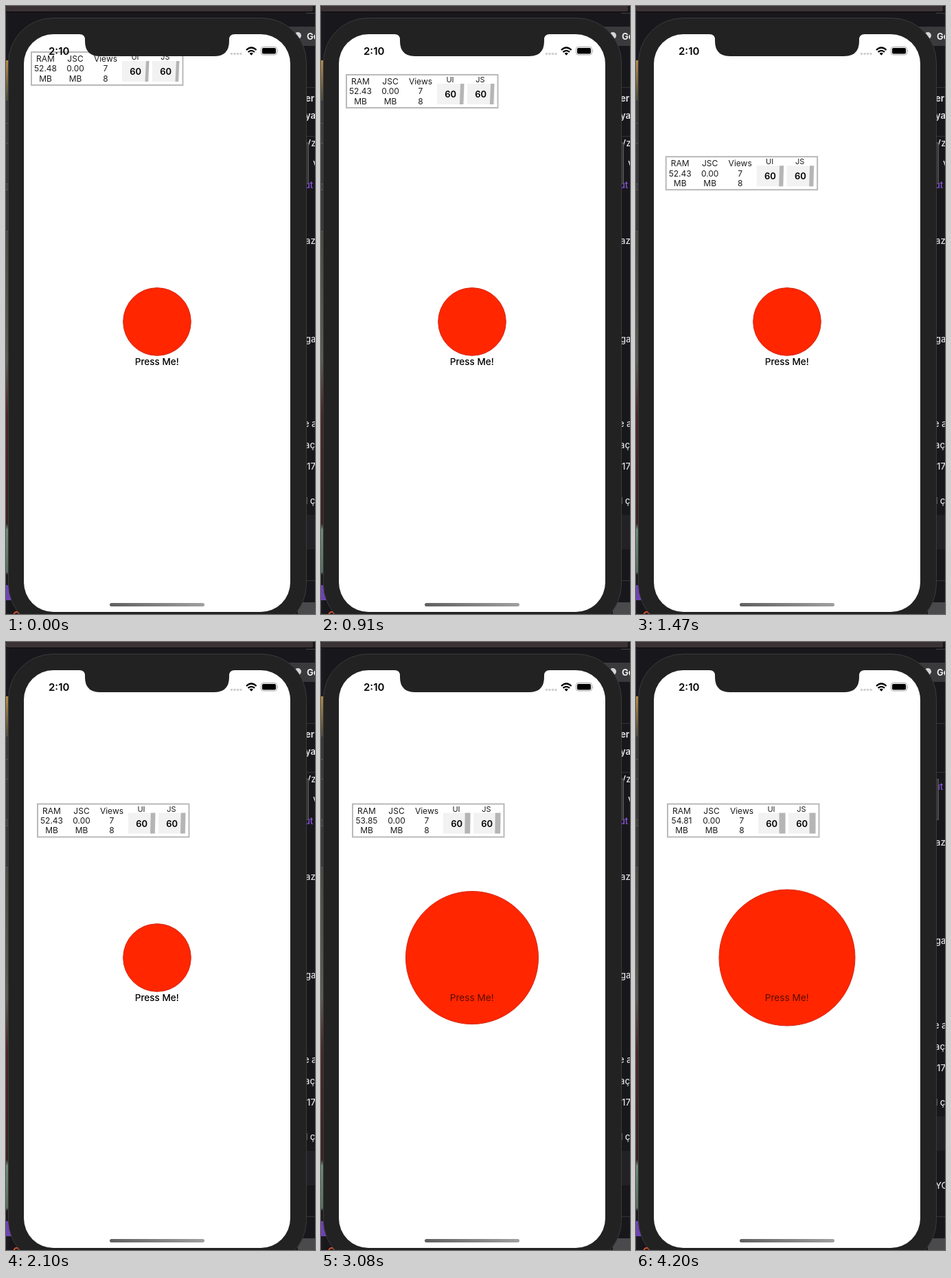
An HTML page that plays this animation: 450x884 px, repeating every 4.27 s.

```html
<!DOCTYPE html>
<html lang="en">
<head>
<meta charset="utf-8">
<style>
html, body { margin: 0; width: 100%; height: 100%; overflow: hidden; background: #18171b; }
svg { display: block; width: 100%; height: 100%; font-family: Inter, Roboto, sans-serif; }
.mid { text-anchor: middle; }
</style>
</head>
<body>
<svg viewBox="0 0 450 884">
  <defs>
    <linearGradient id="strip" x2="0" y2="1">
      <stop offset="0" stop-color="#1c1a1f"/>
      <stop offset=".08" stop-color="#1c1a1f"/>
      <stop offset=".08" stop-color="#b58a42"/>
      <stop offset=".14" stop-color="#55503f"/>
      <stop offset=".16" stop-color="#38383a"/>
      <stop offset=".38" stop-color="#4b4a45"/>
      <stop offset=".58" stop-color="#5b5a54"/>
      <stop offset=".67" stop-color="#4a2426"/>
      <stop offset=".85" stop-color="#3b2022"/>
      <stop offset=".86" stop-color="#6c8a78"/>
      <stop offset=".93" stop-color="#567060"/>
      <stop offset=".935" stop-color="#1c1a1f"/>
    </linearGradient>
    <linearGradient id="bar"><stop stop-color="#606060"/><stop offset="1" stop-color="#a0a0a0"/></linearGradient>
    <clipPath id="chatArea"><rect id="chatClip" x="410" width="40"/></clipPath>
    <clipPath id="screen"><rect x="26" y="41" width="388" height="840" rx="43"/></clipPath>
  </defs>

  <!-- desktop behind the phone -->
  <rect width="450" height="884" fill="#18171b"/>
  <rect width="447" height="8" rx="2" fill="#3a3234"/>
  <path d="M0 8.5H450" stroke="#0b0a0c"/>
  <path d="M437 10.500H450" stroke="#454047"/>
  <rect y="9" width="4" height="875" fill="url(#strip)"/>
  <rect y="842" width="12" height="22" fill="#6f42b4"/>
  <circle cx="15.500" cy="885" r="4" fill="none" stroke="#d9532f" stroke-width="2"/>
  <rect x="405" y="30" width="45" height="28" fill="#3a393c"/>
  <circle cx="425" cy="43" r="5" fill="#d5d5d7"/>
  <text x="438" y="49" font-size="13" font-weight="700" fill="#eee">Ge</text>
  <path d="M430 118.500H450M430 189.500H450M430 835.500H450" stroke="#343338"/>
  <rect x="425" y="867" width="25" height="17" fill="#4a494b"/>
  <g clip-path="url(#chatArea)"><g id="chat" font-size="13" fill="#dedee3">
    <rect x="430" y="740" width="20" height="50" fill="#222126"/>
  </g></g>

  <!-- phone body -->
  <g fill="#39383a" stroke="#59585b">
    <rect x="-6" y="136.500" width="10" height="34"/>
    <rect x="-6" y="199.500" width="10" height="59"/>
    <rect x="-6" y="267.500" width="10" height="60"/>
    <rect x="430" y="199.500" width="10.500" height="59"/>
  </g>
  <rect x="3.500" y="17.500" width="434" height="888" rx="65" fill="#222" stroke="#3b3a3b"/>

  <g clip-path="url(#screen)">
    <rect x="26" y="41" width="388" height="840" fill="#fff"/>
    <text class="mid" x="219.700" y="522" font-size="13.600">Press Me!</text>
    <circle id="ball" cx="220" cy="459" fill="#ff2600" stroke="#d42a12"/>
    <text class="mid" x="219.700" y="522" font-size="13.600" opacity=".65">Press Me!</text>
    <g id="panel" font-size="12" fill="#1c1c1c">
      <rect x="37" y="67" width="220.500" height="48" fill="#fff" stroke="#b9b9b9" stroke-width="2"/>
    </g>
    <rect x="151" y="868" width="138" height="5" rx="2.500" fill="url(#bar)"/>
  </g>
  <path d="M107 40H333V41Q325 41 325 49V51Q325 73 303 73H137Q115 73 115 51V49Q115 41 107 41Z" fill="#222"/>

  <!-- status bar -->
  <text x="62" y="71" font-size="15" font-weight="600">2:10</text>
  <g fill="#d0d0d0">
    <circle cx="328.500" cy="69.500" r="1.800"/><circle cx="333" cy="69.500" r="1.800"/>
    <circle cx="337.500" cy="69.500" r="1.800"/><circle cx="342" cy="69.500" r="1.800"/>
  </g>
  <path d="M350 64Q357.300 57 364.600 64M352.600 67Q357.300 62.600 362 67" fill="none" stroke="#000" stroke-width="2.200"/>
  <path d="M354.700 69Q357.300 66.600 359.900 69L357.300 71.800Z"/>
  <rect x="371.500" y="59.500" width="23" height="11.500" rx="3" fill="none" stroke="#a5a5a5"/>
  <rect x="373" y="61" width="20" height="8.500" rx="1.800"/>
  <path d="M395.600 63.500Q397.200 65.200 395.600 67Z" fill="#a5a5a5"/>
</svg>
<script>
const LOOP = 4270, STEP = 70;
const $ = id => document.getElementById(id);

function add(parent, tag, attrs, text = '') {
  const el = document.createElementNS('http://www.w3.org/2000/svg', tag);
  for (const k in attrs) el.setAttribute(k, attrs[k]);
  el.textContent = text;
  return parent.appendChild(el);
}

// chat fragments peeking out beside the phone
[[436, 139, 'er', 700], [436, 164, 'yal', 600], [435, 204, 'Vzz'], [447, 235, 'V'],
 [435, 265, 'ut', 500, '#8d58e8'], [436, 346, 'azi'], [436, 489, 'ga'], [434, 612, 'e a'],
 [435, 643, 'açs'], [438, 674, '17'], [436, 724, 'l ç'], [436, 845, 'YC']]
  .forEach(([x, y, text, weight = 500, fill = '#dedee3']) =>
    add($('chat'), 'text', { x, y, fill, 'font-weight': weight }, text));

// performance panel
const label = (x, y, text, more) => add($('panel'), 'text', { class: 'mid', x, y, ...more }, text);
const columns = [[57.5, 'RAM', '', 'MB'], [101, 'JSC', '0.00', 'MB'], [145, 'Views', '7', '8']]
  .map(([x, ...rows]) => rows.map((s, i) => label(x, 81.3 + i * 14.1, s)));
const ram = columns[0][1];
const bars = [['UI', 169], ['JS', 213]].map(([name, x]) => {
  label(x + 19, 78, name, { 'font-size': 11 });
  add($('panel'), 'rect', { x, y: 80, width: 39.5, height: 30, fill: '#f2f2f2' });
  label(x + 19.7, 100, '60', { 'font-size': 13, 'font-weight': 600, fill: '#000' });
  return [add($('panel'), 'path', { fill: '#b5b5b5' }), x];
});

const clamp = u => Math.min(1, Math.max(0, u));
const easeInOut = u => u < .5 ? 2 * u * u : 1 - 2 * (1 - u) ** 2;
const ease = (t, from, to) => easeInOut(clamp((t - from) / (to - from)));

// linear track through [time, value] points
const track = (t, points) => points.reduce((v, [time, value], i) => {
  if (!i) return value;
  const [t0, v0] = points[i - 1];
  return t <= t0 ? v : v0 + (value - v0) * clamp((t - t0) / (time - t0));
}, 0);

function draw(t) {
  const dx = track(t, [[910, 0], [1190, 2], [1610, 9]]);
  const dy = track(t, [[560, 0], [770, 11], [910, 33], [1190, 97.5], [1400, 144], [1610, 168.5]]);
  $('panel').setAttribute('transform', `translate(${dx} ${dy})`);
  ram.textContent = t < 630 ? '52.48' : t < 2590 ? '52.43' : t < 3570 ? '53.85' : '54.81';

  const wide = 4.5 + 4.5 * t / LOOP, slant = 1.5 * (1 - t / LOOP);
  for (const [bar, x] of bars)
    bar.setAttribute('d', `M${x + 39.5 - wide} 80H${x + 39.5}L${x + 39.5 - slant} 110H${x + 39.5 - wide - slant}Z`);

  $('ball').setAttribute('r', 49.3 + 49.7 * ease(t, 2490, 3190));

  const scroll = ease(t, 3710, 4130), top = 119 + 71 * scroll;
  $('chat').setAttribute('transform', `translate(0 ${-50.5 * scroll})`);
  $('chatClip').setAttribute('y', top);
  $('chatClip').setAttribute('height', 835 - top);
}

const start = performance.now();
function tick() {
  const t = (performance.now() - start) % LOOP;
  draw(Math.floor(t / STEP) * STEP);
  requestAnimationFrame(tick);
}
tick();
</script>
</body>
</html>
```
